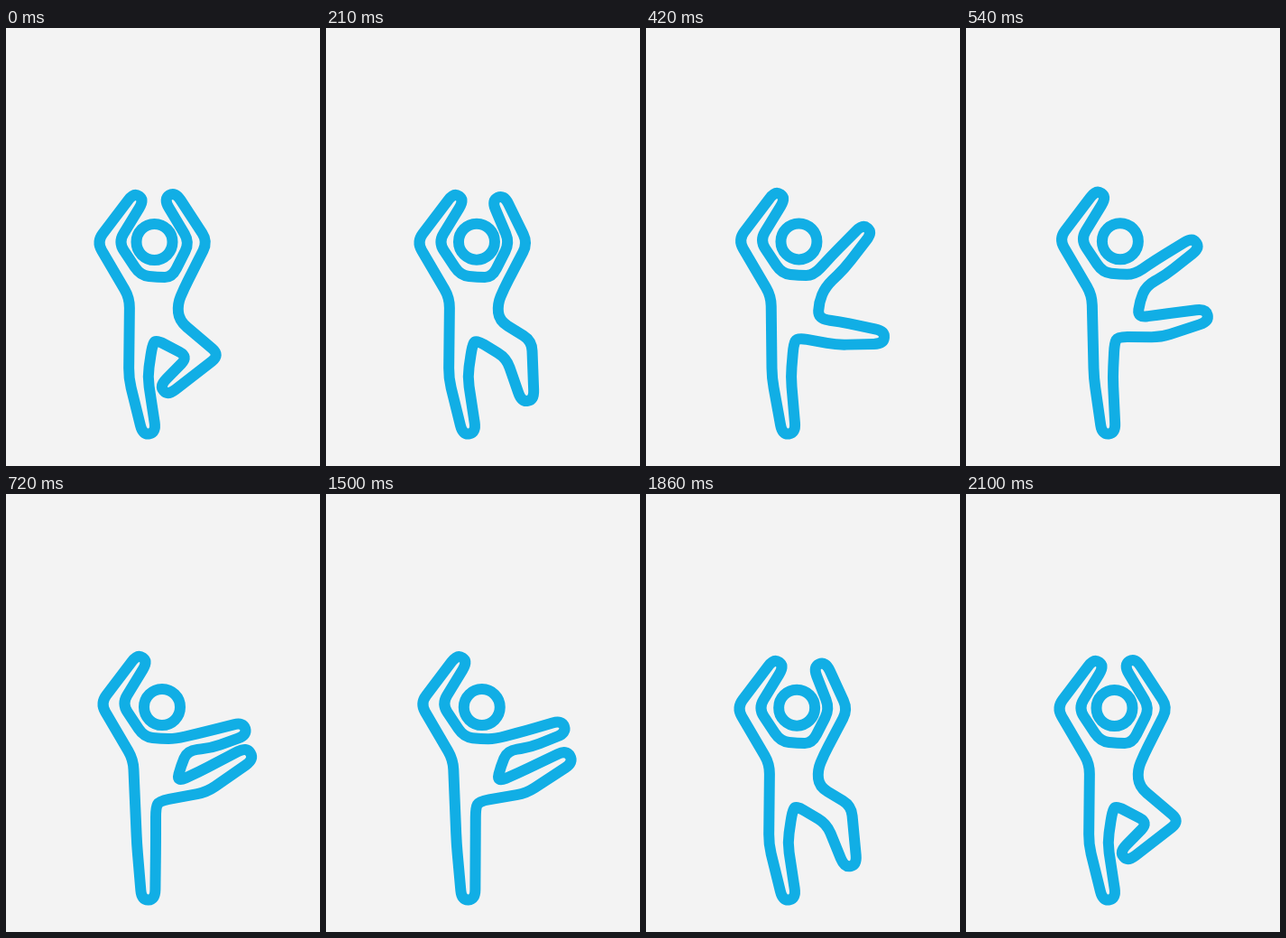
Recreate the animation shown at these times as an HTML page with a canvas. Size 348 by 485 pixels, loop 3.03 s.

```html
<!DOCTYPE html>
<html lang="en">
<head>
<meta charset="utf-8">
<title>Balance pose</title>
<style>
  html, body { margin: 0; width: 100%; height: 100%; overflow: hidden; background: #f3f3f3; }
  canvas { display: block; }
</style>
</head>
<body>
<canvas id="stage" width="348" height="485"></canvas>
<script>
const ctx = document.getElementById('stage').getContext('2d');
const LOOP = 3030, STEP = 30;
const POSE_TIMES = [0, 210, 420, 720];

// Moving limbs, one row per pose: joint x, y, half width, tip x, y, half width.
const ARM = [
  [213.5, 237, 10, 185, 191.5, 7.5],
  [213.5, 238, 10, 193.5, 194.5, 7.5],
  [213, 259, 10, 241, 227, 7],
  [225, 272, 9.5, 258, 262, 7.5]
];
const LEG = [
  [219.5, 363, 17.5, 180, 397, 7],
  [214, 356, 17, 222.5, 406, 7],
  [213, 338, 13, 257, 342, 7],
  [218, 319, 12, 264, 291, 8]
];

// Cubic curve through (ts, vs) that never overshoots.
function spline(ts, vs, t) {
  const last = ts.length - 1;
  if (t <= ts[0]) return vs[0];
  if (t >= ts[last]) return vs[last];
  let i = 0;
  while (t > ts[i + 1]) i++;
  const rate = k => (vs[k + 1] - vs[k]) / (ts[k + 1] - ts[k]);
  const slope = k => {
    if (k === 0) return rate(0);
    if (k === last) return rate(last - 1);
    const a = rate(k - 1), b = rate(k);
    return a * b > 0 ? 2 * a * b / (a + b) : 0;
  };
  const h = ts[i + 1] - ts[i], u = (t - ts[i]) / h, w = 1 - u;
  return w * w * (1 + 2 * u) * vs[i] + u * u * (3 - 2 * u) * vs[i + 1]
    + h * u * w * (w * slope(i) - u * slope(i + 1));
}

const atPose = (values, p) => spline(POSE_TIMES, values, p);
const morph = (rows, p) => rows[0].map((_, i) => atPose(rows.map(r => r[i]), p));

function poseTime(t) {
  return t < 1470 ? Math.min(t, 720) : spline([1486, 1860, 2100], [720, 225, 0], t);
}

const unit = (a, b) => {
  const d = Math.hypot(b[0] - a[0], b[1] - a[1]) || 1;
  return [(b[0] - a[0]) / d, (b[1] - a[1]) / d];
};

// Outline of a bent limb growing between two trunk points.
function limb(from, to, [jx, jy, jw, tx, ty, tw]) {
  const root = [(from[0] + to[0]) / 2, (from[1] + to[1]) / 2];
  const a = unit(root, [jx, jy]), d = unit([jx, jy], [tx, ty]);
  const bend = unit([0, 0], [a[0] + d[0], a[1] + d[1]]);
  const joint = s => [jx + s * bend[1] * jw, jy - s * bend[0] * jw];
  const tip = s => [tx + (d[0] + s * d[1]) * tw, ty + (d[1] - s * d[0]) * tw];
  return [from, joint(1), tip(1), tip(-1), joint(-1), to];
}

// Closed polygon with softened corners.
function outline(pts, radius) {
  const n = pts.length;
  const toward = (a, b) => {
    const u = unit(a, b);
    const r = Math.min(radius, Math.hypot(b[0] - a[0], b[1] - a[1]) / 2);
    return [a[0] + u[0] * r, a[1] + u[1] * r];
  };
  ctx.beginPath();
  pts.forEach((c, i) => {
    ctx.lineTo(...toward(c, pts[(i + n - 1) % n]));
    ctx.quadraticCurveTo(...c, ...toward(c, pts[(i + 1) % n]));
  });
  ctx.closePath();
  ctx.stroke();
}

function draw(t) {
  const p = poseTime(t);
  const lean = atPose([0, 0, 0.4, 1], p);
  const at = (x, y) => [x + 4 * lean, y - 5 * lean];

  ctx.fillStyle = '#f3f3f3';
  ctx.fillRect(0, 0, 348, 485);
  ctx.strokeStyle = '#11aee5';
  ctx.lineWidth = 12;
  ctx.lineJoin = 'round';

  const raised = [...at(112.5, 237), 12, ...at(143.5, 192), 7];
  const standing = [146.5 + 9 * lean, 387, 10.5, 157.5, 442, 7.5];
  const side = at(137, 299), crotch = at(162, 352);
  outline([
    ...limb(side, at(149, 274), raised),
    at(168, 276),
    ...limb(at(184, 276), at(197, 289), morph(ARM, p)),
    at(190, 306),
    ...limb(at(192 - 7 * lean, 324), at(166, 345), morph(LEG, p)),
    ...limb(crotch, side, standing).slice(0, -1)
  ], 11);

  ctx.beginPath();
  ctx.arc(164.5 + 8.5 * p / 720, 237 - p / 720, 20, 0, Math.PI * 2);
  ctx.stroke();
}

const start = performance.now();
function tick() {
  const t = (performance.now() - start) % LOOP;
  draw(Math.floor(t / STEP) * STEP);
  requestAnimationFrame(tick);
}
tick();
</script>
</body>
</html>
```
